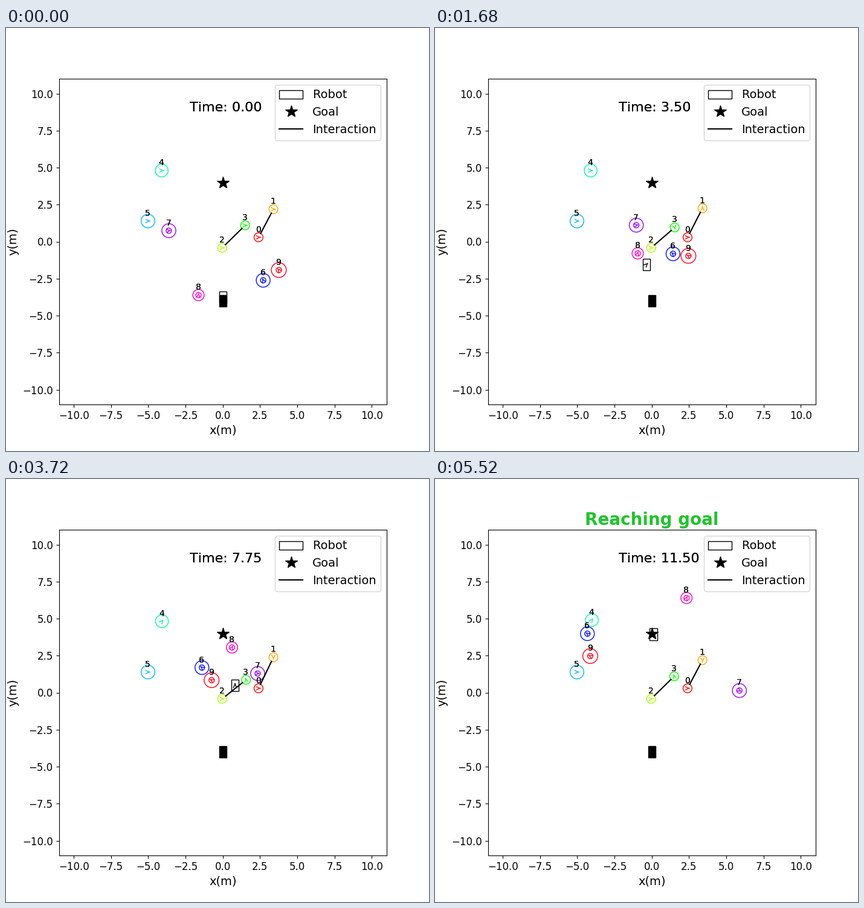
Recreate the animation shown at these times as a matplotlib script. Size 700 by 700 pixels, loop 5640 ms.

```python
import numpy as np
import matplotlib.pyplot as plt
from matplotlib import patches
from matplotlib.animation import FuncAnimation
from matplotlib.lines import Line2D

FRAMES = 47
INTERVAL = 120
STEP = 0.25
ROBOT_W, ROBOT_H = 0.5, 0.8
ARROW_LEN = 0.25
KEYS = [0, 19, 31, 46]
PAIRS = [(0, 1), (2, 3)]

# Robot steps: compass direction and how often; "-" waits
MOVES = [("N", 2), ("NW", 3), ("N", 4), ("-", 4), ("NE", 2), ("E", 4),
         ("SE", 1), ("-", 2), ("NE", 1), ("N", 3), ("NW", 2), ("N", 13),
         ("NW", 4), ("N", 1)]
COMPASS = ["E", "NE", "N", "NW", "W", "SW", "S", "SE"]

plt.rcParams["text.kerning_factor"] = 6
clock = np.arange(FRAMES)


def ramp(start, peak, end):
    """Rise from 0 to 1 and back to 0, in straight lines."""
    return np.interp(clock, [start, peak, end], [0, 1, 0])


def sway(home, shift, amount):
    """Leave a resting place by a share of a shift."""
    return np.array(home) + np.outer(amount, shift)


def rest(x, y):
    return sway((x, y), (0, 0), ramp(0, 1, 2))


def walk(*points):
    """Smooth cubic path through four key points."""
    fits = [np.polyfit(KEYS, axis, 3) for axis in np.transpose(points)]
    return np.column_stack([np.polyval(f, clock) for f in fits])


def drive(start):
    """Robot places and headings, one fixed step per frame."""
    pos, angle = np.array(start), np.pi / 2
    places, angles = [pos], [angle]
    for name, count in MOVES:
        for _ in range(count):
            if name != "-":
                angle = COMPASS.index(name) * np.pi / 4
                pos = pos + STEP * np.array([np.cos(angle), np.sin(angle)])
            places.append(pos)
            angles.append(angle)
    return places, angles


def headings(pos):
    """Direction of travel per frame; a stop keeps the last direction."""
    out = [0.0]
    for dx, dy in np.diff(pos, axis=0):
        out.append(np.arctan2(dy, dx) if np.hypot(dx, dy) > 1e-4 else out[-1])
    return out


# Each person: radius and path in metres
people = [
    (0.3, rest(2.40, 0.29)),
    (0.3, sway((3.40, 2.19), (0, 0.27), ramp(10, 28, 39))),
    (0.3, rest(-0.04, -0.42)),
    (0.3, sway((1.50, 1.10), (0.09, -0.35), ramp(5, 27, 39))),
    (0.43, sway((-4.10, 4.80), (0.08, 0.10), ramp(27, 46, 65))),
    (0.46, rest(-5.02, 1.39)),
    (0.465, walk((2.71, -2.61), (0.70, -0.11), (-1.40, 1.69), (-4.32, 3.98))),
    (0.47, walk((-3.62, 0.74), (-0.09, 1.25), (2.34, 1.29), (5.88, 0.14))),
    (0.38, walk((-1.63, -3.61), (-0.55, 0.31), (0.62, 3.05), (2.33, 6.39))),
    (0.5, walk((3.76, -1.92), (1.65, -0.48), (-0.75, 0.84), (-4.13, 2.47))),
]
walkers = range(6, 10)
radii, paths = zip(*people)
turns = [headings(p) for p in paths]
for i in walkers:
    turns[i][0] = turns[i][1]
robot_pos, robot_turn = drive((0, -3.75))

fig, ax = plt.subplots(figsize=(7, 7), dpi=100)
ax.set_xlim(-11, 11)
ax.set_ylim(-11, 11)
ax.tick_params(labelsize=12)
ax.set_xlabel("x(m)", fontsize=14)
ax.set_ylabel("y(m)", fontsize=14)
title = ax.set_title("", fontsize=20, fontweight="bold", color="#22c32e")


def box(x, y, fill):
    corner = (x - ROBOT_W / 2, y - ROBOT_H / 2)
    return ax.add_patch(patches.Rectangle(
        corner, ROBOT_W, ROBOT_H, fill=fill, facecolor="black",
        edgecolor="black"))


def ring(radius, color):
    return ax.add_patch(patches.Circle((0, 0), radius, fill=False,
                                       edgecolor=color))


def arrow(color):
    style = patches.ArrowStyle("->", head_length=4, head_width=2)
    return ax.add_patch(patches.FancyArrowPatch(
        (0, 0), (ARROW_LEN, 0), color=color, arrowstyle=style))


def aim(item, pos, angle):
    tip = pos + ARROW_LEN * np.array([np.cos(angle), np.sin(angle)])
    item.set_positions(tuple(pos), tuple(tip))


box(0, -4, True)
robot = box(0, -3.75, False)
robot_arrow = arrow("black")
goal = ax.add_line(Line2D([0], [4], color="black", marker="*",
                          linestyle="None", markersize=15))
links = [ax.add_line(Line2D([], [], color="black", lw=1.5)) for _ in PAIRS]
ax.legend([robot, goal, links[0]], ["Robot", "Goal", "Interaction"],
          loc="upper right", fontsize=14)

cmap = plt.get_cmap("hsv", len(people))
colors = [cmap(i) for i in range(len(people))]
rings = [ring(r, c) for r, c in zip(radii, colors)]
cores = {i: ring(0.18, colors[i]) for i in walkers}
arrows = [arrow(c) for c in colors]

# Texts are laid down twice for their heavier edge
labels = [[ax.text(0, 0, str(i), fontsize=10) for _ in range(2)]
          for i in range(len(people))]
timers = [ax.text(0.4, 0.9, "", fontsize=16, transform=ax.transAxes)
          for _ in range(2)]


def update(n):
    x, y = robot_pos[n]
    robot.set_xy((x - ROBOT_W / 2, y - ROBOT_H / 2))
    aim(robot_arrow, robot_pos[n], robot_turn[n])

    for i, path in enumerate(paths):
        pos = path[n]
        rings[i].center = tuple(pos)
        if i in cores:
            cores[i].center = tuple(pos)
        aim(arrows[i], pos, turns[i][n])
        for label in labels[i]:
            label.set_position((pos[0] - 0.2, pos[1] + 0.35))

    for link, (a, b) in zip(links, PAIRS):
        start, end = paths[a][n], paths[b][n]
        gap = (end - start) / np.hypot(*(end - start)) * radii[a]
        link.set_data(*np.transpose([start + gap, end - gap]))

    for timer in timers:
        timer.set_text(f"Time: {n * STEP:.2f}")
    title.set_text("Reaching goal" if n == FRAMES - 1 else "")
    return []


anim = FuncAnimation(fig, update, frames=FRAMES, interval=INTERVAL,
                     repeat=True, repeat_delay=0, blit=False)
plt.show()
```
